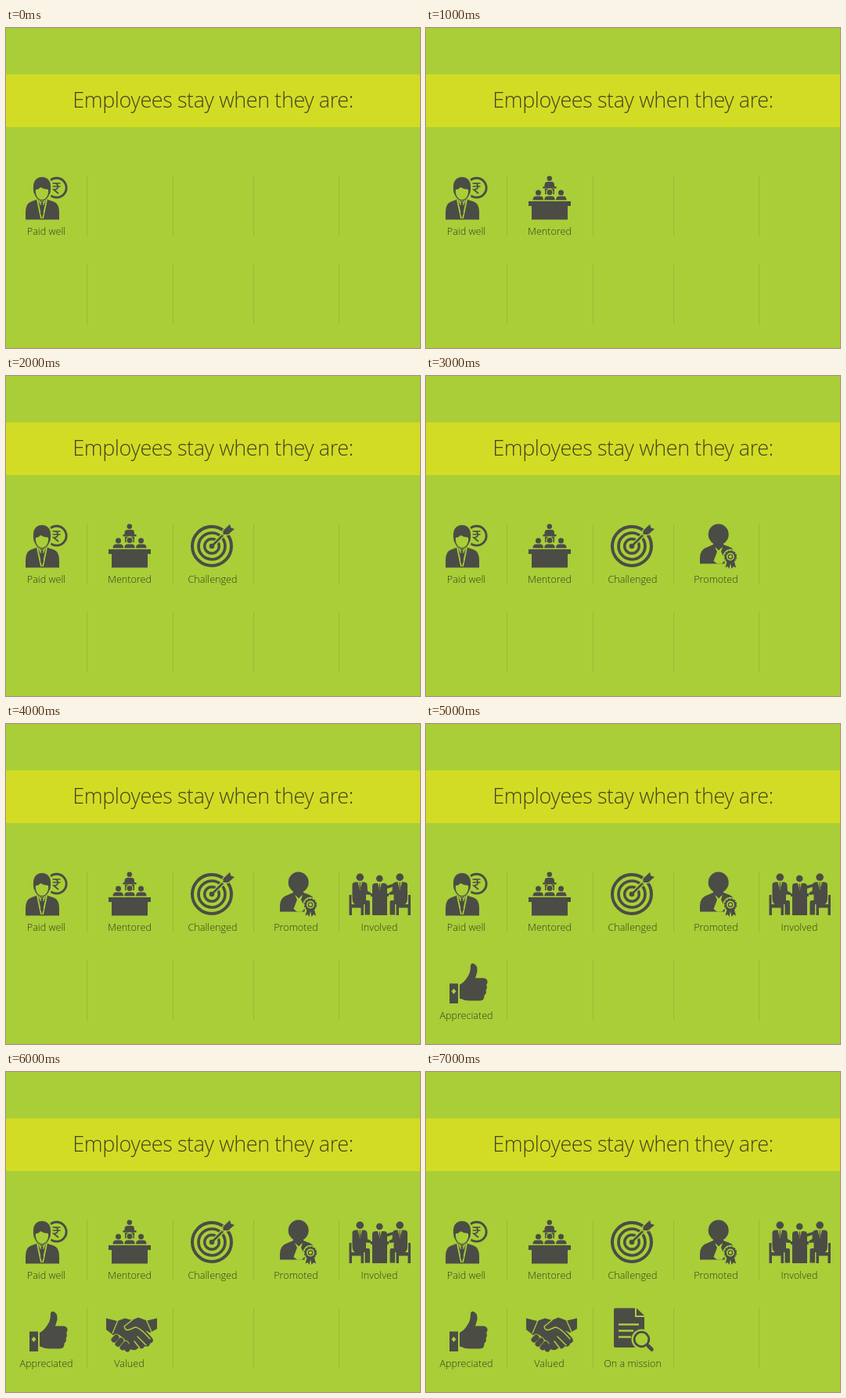
An HTML page that plays this animation: 529 px wide and 410 px high, repeating every 8000 ms.

```html
<!DOCTYPE html>
<html lang="en">
<head>
<meta charset="utf-8">
<title>Employees stay when they are</title>
<style>
html, body { margin: 0; width: 100%; height: 100%; overflow: hidden; background: #a9ce38; }
svg { display: block; width: 529px; height: 410px; }
text { font-family: "Open Sans", "Noto Sans", sans-serif; font-weight: 300; text-anchor: middle; }
.title { font-size: 27px; letter-spacing: -.42px; fill: #42431f; }
.label { font-size: 12.6px; fill: #343b20; }
.item { fill: #4b4c46; stroke: none; visibility: hidden; }
.g { fill: #a9ce38; }
.line { fill: none; stroke: #4b4c46; }
.cut { fill: none; stroke: #a9ce38; }
.round { stroke-linecap: round; stroke-linejoin: round; }
</style>
</head>
<body>
<svg viewBox="0 0 529 410">
  <rect width="529" height="410" fill="#a9ce38"/>
  <rect y="59.5" width="529" height="67.5" fill="#d3dc24"/>
  <text class="title" x="264.5" y="102.3">Employees stay when they are:</text>
  <path d="M103.5 190V267M213.5 190V267M316.5 190V267M425.5 190V267M103.5 302V380M213.5 302V380M316.5 302V380M425.5 302V380" stroke="#97bb36" fill="none"/>

  <g class="item">
    <circle class="line" cx="64.7" cy="204.7" r="12.4" stroke-width="2.9"/>
    <path class="line" d="M59.500 199H69.500M59.500 203H69.500M61 199C68 199 68 207 61 207L67 212" stroke-width="1.7"/>
    <path class="g" d="M33 208C31 195 38 189 46 189C55 189 61 196 59 208Q58 218 52 223H40Q34 218 33 208Z"/>
    <path d="M35.500 211C33 197 38 191 46 191C54 191 59 197 56.500 211L54 216Q51 221 46 221Q41 221 38 216Z"/>
    <path class="g" d="M38 207Q42 207 44 204Q49 207 54 207C55 214 51 220 46 220C41 220 37 214 38 207Z"/>
    <path d="M25 245.500V236Q25 225 32 222.500L40 219.500Q46 224 52 219.500L61 222.500Q68 225 68 236V245.500Z"/>
    <path class="cut" d="M40 220L45 244M52 220L47 244" stroke-width="1.800"/>
    <path class="g" d="M41 220L46 224L51 220L48 227H44Z"/>
    <path d="M44.500 224H47.500L47 228L48 238L46 242L44 238L45 228Z"/>
    <text class="label" x="51.5" y="265">Paid well</text>
  </g>

  <g class="item">
    <circle cx="157.800" cy="192.800" r="3.200"/>
    <path d="M151.500 203Q151 197 155 197H161Q164.500 197 164 203Z"/>
    <path d="M149.500 203H166.500V205.500H149.500ZM152 206H164V213H152Z"/>
    <circle class="g" cx="158" cy="210.500" r="4.700"/>
    <circle cx="143.500" cy="211" r="3.500"/><circle cx="158" cy="210.500" r="3.500"/><circle cx="172.500" cy="211" r="3.500"/>
    <path id="bust" d="M136.500 220.500Q136.500 215.500 141 215.500H146Q150 215.500 150 220.500Z"/>
    <use href="#bust" x="14.700"/><use href="#bust" x="29.500"/>
    <path d="M131 222H185V228H181V245.500H135V228H131Z"/>
    <text class="label" x="158" y="265">Mentored</text>
  </g>

  <g class="item">
    <g class="line">
      <circle cx="263" cy="218" r="25" stroke-width="4"/>
      <circle cx="263" cy="218" r="17" stroke-width="3.700"/>
      <circle cx="263" cy="218" r="9.300" stroke-width="3.400"/>
    </g>
    <circle cx="263" cy="218" r="3.300"/>
    <path class="cut" d="M265 216L287 194" stroke-width="5.500"/>
    <path class="line" d="M262 219L284 197" stroke-width="2.600"/>
    <path class="cut" d="M277.500 203V198L286 190L287.500 194.500L292 196L284 203Z" stroke-width="2.500"/>
    <path d="M277.500 203V198L286 190L287.500 194.500L292 196L284 203Z"/>
    <text class="label" x="264" y="265">Challenged</text>
  </g>

  <g class="item">
    <ellipse cx="373.700" cy="203" rx="13" ry="13.500"/>
    <path d="M350 240.500V233Q350 222 360 219L367 216V212H380V216L388 219Q395 222 396 232V240.500Z"/>
    <path class="g" d="M369 219L374 223L379 219L377 225L382 236L378 240.500H372L367.500 237L372 225Z"/>
    <path d="M372 219H376L375 223H373Z"/>
    <circle class="g" cx="389" cy="231.500" r="9.700"/>
    <path class="g" d="M382 235H398V249H381Z"/>
    <path d="M385 236L382.500 245.500L385.500 244L387.500 247L389 240L390.500 247L393 244L396 245.500L393.500 236Z"/>
    <circle class="g" cx="389" cy="231.500" r="6"/>
    <circle class="line" cx="389" cy="231.500" r="6" stroke-width="2"/>
    <circle class="line" cx="389" cy="231.500" r="7.300" stroke-width="1.700" stroke-dasharray="2.860 .962"/>
    <circle class="line" cx="389" cy="231.500" r="2.700" stroke-width="1.300"/>
    <text class="label" x="370.5" y="265">Promoted</text>
  </g>

  <g class="item">
    <g id="sitter">
      <circle cx="452.300" cy="196.300" r="4.800"/>
      <path d="M442.500 222V206Q442.500 202.500 447 202.500H457Q461 202.500 461.500 206L462 214L466 216V219L460 218.500V226H463Q465 226 465 229V244.500H458.500V231H446Q442.500 230 442.500 222Z"/>
      <path class="g" d="M449.500 202.500H455L452.300 213Z"/>
      <path class="line" d="M452.300 203V211" stroke-width="1.200"/>
      <path d="M438.500 219H441.500V231H457V245H453.500V235.500H442V245H438.500Z"/>
    </g>
    <circle cx="477.300" cy="198" r="4.300"/>
    <path d="M468 217V208Q468 204 472 204H483Q487 204 487 208V217Z"/>
    <path class="g" d="M475 204H480L477.500 213Z"/>
    <path class="line" d="M477.500 204.500V211" stroke-width="1.200"/>
    <path d="M466 217H489V221H487V245H468V221H466Z"/>
    <use href="#sitter" transform="matrix(-1 0 0 1 955.5 0)"/>
    <path class="line round" d="M497 206L485 209.500" stroke-width="3.800"/>
    <text class="label" x="477" y="265">Involved</text>
  </g>

  <g class="item">
    <path d="M30 332.500H41V358H30Z"/>
    <path class="g" d="M35.500 339L38.500 342.500L35.500 346L32.500 342.500Z"/>
    <path d="M43 334Q49 331 53 324Q57 319 57 309Q58 306 61 307Q66 309 65.500 317L63 325.500H74Q79 326.500 78.500 331Q78.500 333 77 334Q79 337.500 76.500 341Q78 345 74.500 347.500Q75 354 69 354.500H56Q49 354.500 43 351.500Z"/>
    <text class="label" x="51.500" y="377.500">Appreciated</text>
  </g>

  <g class="item">
    <path d="M128 315.500L142 319L152 315.500L161 318L169 314.500L180 318.500L193 315.500V329L184 334L178 331L187 341Q190 346 184 348Q183 353 177 351.500Q175 356 169 353.500Q165 358 159 355L154 345L145 337L138 338L128 330Z"/>
    <path class="cut round" d="M161 318L151 326Q152 332 158 330L165 327Q171 327 184 342M168 339L179 350M164 345L171 354" stroke-width="1.500"/>
    <path class="cut" d="M143 318L136 335M179 317L186 333" stroke-width="1.300"/>
    <g class="cut round" stroke-width="9"><path d="M138 343L141 340M143 348.500L147 344M149 353L153 348.500"/></g>
    <g class="line round" stroke-width="7"><path d="M138 343L141 340M143 348.500L147 344M149 353L153 348.500M155 355L157 352.500"/></g>
    <text class="label" x="157.500" y="377.500">Valued</text>
  </g>

  <g class="item">
    <path d="M242 302.500H267V314H279V353H242Q240 353 240 351V304.500Q240 302.500 242 302.500ZM269 302.500L279 312H269Z"/>
    <path class="cut" d="M246 323.500H272M246 331.500H265M246 339.500H262" stroke-width="2.400"/>
    <circle class="g" cx="275.500" cy="342.500" r="13"/>
    <path class="cut" d="M281 347.500L290 356.500" stroke-width="7.500"/>
    <path class="line round" d="M284 351L288.500 355.500" stroke-width="4.600"/>
    <circle class="line" cx="275.500" cy="342.500" r="9.300" stroke-width="2.800"/>
    <text class="label" x="264" y="377.500">On a mission</text>
  </g>
</svg>
<script>
const items = document.querySelectorAll('.item');
const step = 1000;

// One more item appears at every step; the loop then starts over.
function draw(now) {
  const last = Math.floor(now / step) % items.length;
  items.forEach((item, i) => {
    item.style.visibility = i <= last ? 'visible' : 'hidden';
  });
}

const start = performance.now();
function tick() {
  draw(performance.now() - start);
  requestAnimationFrame(tick);
}
tick();
</script>
</body>
</html>
```
